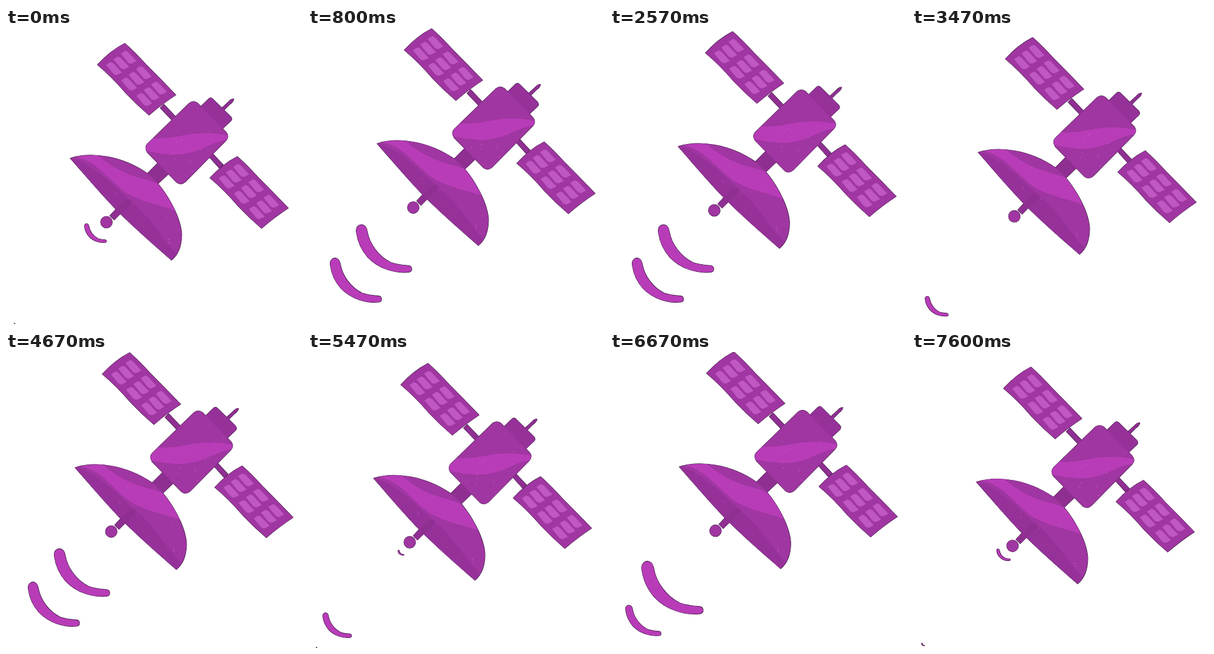
These frames come from a looping animation (500 px wide and 500 px high, 7660 ms). An HTML page:

```html
<!DOCTYPE html>
<html lang="en">
<head>
<meta charset="utf-8">
<title>Satellite</title>
<style>
  html, body { margin: 0; width: 100%; height: 100%; overflow: hidden; background: #fff; }
  svg { display: block; width: 100vw; height: 100vh; }
  .line { stroke: #22092a; stroke-width: 1.3; stroke-linejoin: round; paint-order: stroke; }
  .main { fill: #a036a1; }
  .dark { fill: #8f2f92; }
  .shade { fill: #96319a; }
  .light { fill: #b83cb8; }
  .cell { fill: #bf58c2; stroke: #bf58c2; stroke-width: 1.5; stroke-linejoin: round; }
  .speck { fill: #c455c6; }
</style>
</head>
<body>
<svg viewBox="0 0 500 500">
  <defs>
    <path id="bodyShape" d="M310 127Q317 122 324 127L372 176Q378 183 372 190L303 260Q296 266 289 261L239 210Q234 202 239 196Z"/>
    <path id="dishShape" d="M109 220C145 209 195 216 238 245C268 268 295 317 297 348C297 367 291 383 280 392C248 364 215 336 184 304C157 276 133 247 109 220Z"/>
    <path id="panelShape" d="M201 26Q217 40 237 62Q262 87 287 113Q264 128 242 147Q222 130 203 110Q179 82 155 62Q177 38 201 26Z"/>
    <path id="waveShape" d="M-51-30C-53-42-44-47-37-43C-33-41-32-37-31-32C-27-9-10 15 13 26C24 30 34 31 46 32C54 33 54 43 47 44C20 47-10 37-30 16C-43 1-49-15-51-30Z"/>
    <clipPath id="bodyClip"><use href="#bodyShape"/></clipPath>
    <clipPath id="dishClip"><use href="#dishShape"/></clipPath>
    <g id="cells"></g>
    <g id="hull">
      <path class="dark" d="M267 129L287 150L281 156L261 135ZM344 218L350 213L367 231L361 237Z"/>
      <use href="#panelShape" class="main"/>
      <use href="#panelShape" class="main" x="190" y="191.3"/>
      <path class="dark" d="M365 135L376 125Q380 120 385 120Q384 125 378 129L368 139Z"/>
      <path class="shade" d="M343 119.500Q346 117 349 119.500L380 150Q383 154 380 157L364 172L327 135Z"/>
      <path class="dark" d="M238 247L257 228L275 246L256 264Z"/>
      <use href="#bodyShape" class="main"/>
      <path class="dark" d="M176 317L189 303L198 309L183 324Z"/>
      <use href="#dishShape" class="main"/>
      <circle class="main" cx="170" cy="328" r="9.7"/>
    </g>
  </defs>
  <g id="waves"></g>
  <g id="satellite">
    <use href="#hull" class="line"/>
    <use href="#hull"/>
    <use href="#cells"/>
    <use href="#cells" x="190" y="191.3"/>
    <g clip-path="url(#bodyClip)">
      <path class="light" d="M230 186L251 186C292 189 318 169 376 182V189C345 191 329 214 282 214Q256 212 230 206Z"/>
      <g id="bodySpecks"></g>
    </g>
    <g clip-path="url(#dishClip)">
      <path class="shade" d="M105 217C154 232 184 270 211 292C241 316 259 349 288 381L280 395L180 306Z"/>
      <path class="light" d="M120 212H152C180 236 201 247 236 256Q254 261 268 268L286 308C258 298 232 294 206 280C176 261 158 227 120 218Z"/>
      <g id="dishSpecks"></g>
    </g>
    <path class="dark" d="M176 317L194 298Q201 290 211 290Q212 297 206 303L183 324Z"/>
  </g>
</svg>
<script>
const LOOP = 7660;
const STEP_STARTS = [0, 100, 170, 270, 330];
const BOB_STEPS = 24, WAVE_STEPS = 48;
const WAVE_BIRTHS = [-2, 4, 20, 26];

// age in steps, centre x, centre y, width
const WAVE_KEYS = [
  [0, 157, 339, 10], [1, 154.5, 342.5, 23], [2, 151, 346.5, 37],
  [4, 141, 357.5, 66], [6, 128, 372.5, 94], [7, 120.5, 381, 102],
  [9, 105, 398, 104], [12, 80.5, 426, 87], [15, 56, 453.5, 60],
  [16, 49, 461.5, 48.5], [17, 41.5, 470, 39], [19, 29, 483, 20],
  [21, 18.7, 494, 5], [22, 14.5, 499, 1]
];

const $ = id => document.getElementById(id);

function add(parent, tag, attrs) {
  const el = document.createElementNS('http://www.w3.org/2000/svg', tag);
  for (const key in attrs) el.setAttribute(key, attrs[key]);
  return parent.appendChild(el);
}

for (let row = 0; row < 3; row++) {
  for (let col = 0; col < 3; col++) {
    const x = 183 + row * 25.6 + col * 12.3;
    const y = 68.5 + row * 26 - col * 9.6;
    add($('cells'), 'path', {
      class: 'cell', d: 'M-12.5-6L-6-10Q-3-10-1-7.5L12 6.5L5 10Q1 10.500-1 8Z',
      transform: `translate(${x} ${y})`
    });
  }
}

let seed = 7;
const random = () => (seed = seed * 16807 % 2147483647) / 2147483647;

function addSpecks(parent, count, x, y, w, h) {
  for (let i = 0; i < count; i++) {
    add(parent, 'circle', {
      class: 'speck', cx: x + random() * w, cy: y + random() * h, r: 0.4 + random() * 0.6
    });
  }
}
addSpecks($('bodySpecks'), 22, 240, 165, 130, 85);
addSpecks($('dishSpecks'), 32, 130, 215, 165, 165);

const waves = WAVE_BIRTHS.map(() =>
  add($('waves'), 'use', { href: '#waveShape', class: 'light line' }));

function waveAt(age) {
  const i = Math.max(1, WAVE_KEYS.findIndex(key => key[0] >= age));
  const a = WAVE_KEYS[i - 1], b = WAVE_KEYS[i];
  const k = (age - a[0]) / (b[0] - a[0]);
  return a.map((v, n) => v + (b[n] - v) * k);
}

function stepAt(ms) {
  const rest = ms % 400;
  return Math.floor(ms / 400) * 5 + STEP_STARTS.filter(s => s <= rest).length - 1;
}

function draw(ms) {
  const step = stepAt(ms % LOOP);
  const lift = (1 - Math.cos(2 * Math.PI * step / BOB_STEPS)) / 2;
  $('satellite').setAttribute('transform', `translate(${8.7 * lift - 0.3} ${-26.5 * lift})`);

  waves.forEach((wave, i) => {
    const age = (step - WAVE_BIRTHS[i] + WAVE_STEPS) % WAVE_STEPS;
    const visible = age <= 22;
    wave.style.display = visible ? '' : 'none';
    if (!visible) return;
    const [, x, y, width] = waveAt(age);
    const scale = width / 104;
    wave.setAttribute('transform', `translate(${x} ${y}) scale(${scale})`);
    wave.style.strokeWidth = 1.3 / scale;
  });
}

const start = performance.now();
function tick() {
  draw(performance.now() - start);
  requestAnimationFrame(tick);
}
draw(0);
requestAnimationFrame(tick);
</script>
</body>
</html>
```
